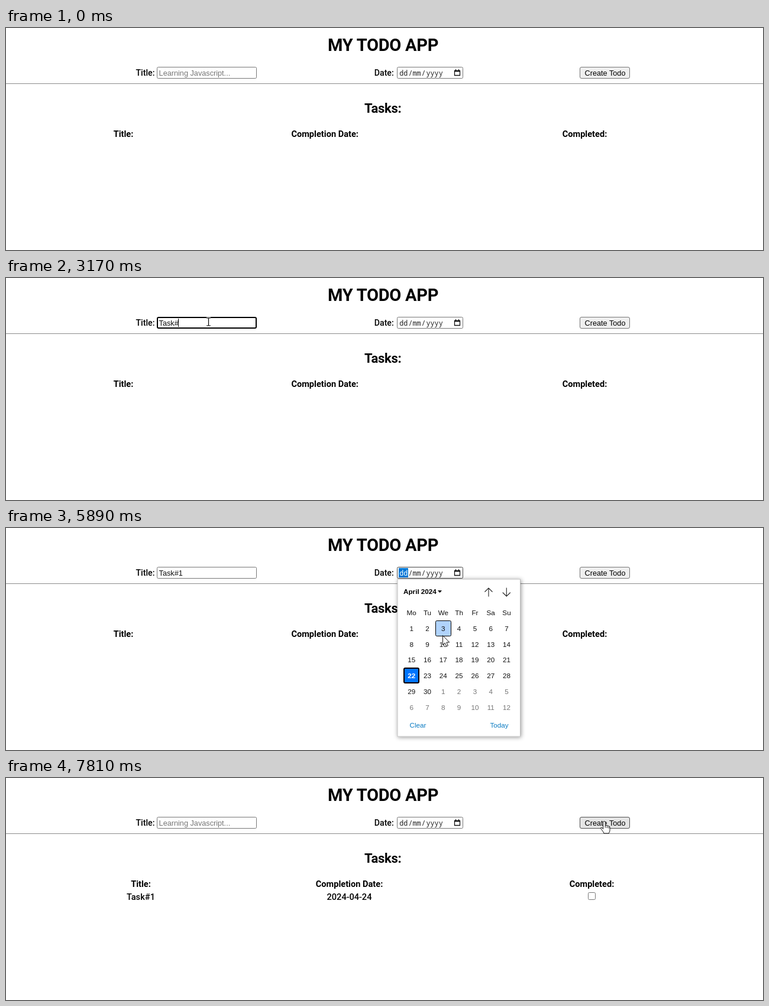
These frames come from a looping animation (1280x377 px, 8 s). An HTML page:

```html
<!DOCTYPE html>
<html lang="en">
<head>
<meta charset="utf-8">
<title>My Todo App</title>
<style>
  html, body { margin: 0; width: 100%; height: 100%; overflow: hidden; background: #fff; }
  svg { display: block; width: 100%; height: 100%; }
  text { white-space: pre; }
  .page { font: 500 14.6px Roboto, sans-serif; }
  .label { font-size: 14.2px; }
  .head { font-weight: 700; }
  .mid { text-anchor: middle; }
  .ui { font: 12.7px "Liberation Sans", Arial, sans-serif; }
  .mono { font: 11.7px "Noto Sans Mono", monospace; }
  .cal { font: 11.7px "Liberation Sans", Arial, sans-serif; }
  .bold { font-weight: 700; }
</style>
</head>
<body>
<svg viewBox="0 0 1280 377" preserveAspectRatio="xMinYMin meet">
  <defs>
    <filter id="shadow" x="-10%" y="-10%" width="120%" height="120%">
      <feDropShadow dx="1" dy="1" stdDeviation="3.5" flood-opacity=".42"/>
    </filter>
  </defs>

  <g class="page">
    <text class="head mid" x="637.7" y="39" font-size="29" letter-spacing="-.25">MY TODO APP</text>
    <text class="label" x="219.5" y="80.5">Title:</text>
    <text class="label" x="622.7" y="80.5">Date:</text>
    <path d="M0 94.5H1280" stroke="#8a8a8a"/>
    <text class="head mid" x="637.2" y="144" font-size="22" letter-spacing="-.3">Tasks:</text>
    <g class="head mid">
      <text id="colTitle" y="185">Title:</text>
      <text id="colDate" y="185">Completion Date:</text>
      <text id="colDone" y="185">Completed:</text>
    </g>
    <g id="row" class="mid">
      <text x="228" y="206.6">Task#1</text>
      <text x="580.5" y="206.6">2024-04-24</text>
      <rect x="984.5" y="194.5" width="12" height="12" rx="2" fill="#fff" stroke="#767676"/>
    </g>
  </g>

  <rect id="titleBox" rx="2" fill="#fff"/>
  <text id="titleText" class="ui" x="258.6" y="80.5"></text>
  <path id="caret" stroke="#000"/>

  <rect id="dateBox" rx="2" fill="#fff"/>
  <rect id="daySelected" x="664" y="68" width="16" height="16" fill="#0078d7"/>
  <g class="mono" fill="#222">
    <text id="day" x="665.2" y="80.6"></text>
    <text x="680.4" y="80.6">/</text>
    <text id="month" x="687.6" y="80.6"></text>
    <text x="702.4" y="80.6">/</text>
    <text id="year" x="710.6" y="80.6"></text>
  </g>
  <path d="M758.5 72.5h9v8h-9zM758.5 73.5h9M760.5 70v2M765.5 70v2" fill="none" stroke="#111" stroke-width="1.3"/>

  <rect id="button" x="970.5" y="66.5" width="84" height="19" rx="2.5"/>
  <text class="ui mid" x="1013" y="80.5">Create Todo</text>

  <g id="popup" class="cal">
    <rect x="662" y="87" width="207.5" height="267" fill="#fff" stroke="#bfbfbf" filter="url(#shadow)"/>
    <text class="bold" x="672" y="112">April 2024</text>
    <path d="M730 106h7l-3.5 4z"/>
    <path d="M816 116.5V102M809.5 108.5L816 102l6.5 6.5M846.3 101.5V116M839.8 109.5l6.5 6.5 6.5-6.5" fill="none" stroke="#222" stroke-width="1.1"/>
    <rect id="hoverCell" width="26" height="26" rx="2" fill="#b0d3fb" stroke="#000"/>
    <rect id="pickedCell" width="25" height="25" rx="2" fill="#0075ff" stroke="#000" stroke-width="2"/>
    <g id="days" class="mid"></g>
    <g fill="#0a7bc2"><text x="682.5" y="338.5">Clear</text><text x="818.5" y="338.5">Today</text></g>
  </g>

  <g id="cursor" stroke-linejoin="round">
    <path id="arrow" d="M0 0V16L3.7 12.6 6.2 18.5 8.9 17.3 6.4 11.6H11.2Z" fill="#fff" stroke="#111"/>
    <g id="beam" fill="none">
      <path d="M-3.5-6.5H3.5M0-6.5V6.5M-3.5 6.5H3.5" stroke="#fff" stroke-width="3"/>
      <path d="M-3.5-6.5H-1L0-6 1-6.5H3.5M0-6V6M-3.5 6.5H-1L0 6 1 6.5H3.5" stroke="#000" stroke-width="1.2"/>
    </g>
    <path id="hand" d="M-1.8 1.5Q-1.8 0 0 0T1.8 1.5V7Q3.8 5.8 4.8 7.6 6.8 6.5 7.6 8.5 9.6 7.9 9.6 10.5V15Q9.6 18 7.6 20.5H-.5Q-1.5 17.5-5 13.5-6.8 10.5-4.5 10.5L-1.8 13ZM1.8 7V11M4.8 8V11.5M7.6 9V12" fill="#fff" stroke="#111"/>
  </g>
</svg>
<script>
const LOOP = 8000;
const FOCUS = 1400, OPEN = 5220, PICK = 6640, CLOSE = 6820, PRESS = 7620, SUBMIT = 7700;
const PITCH = 26.8, GRID_X = 672.3, GRID_Y = 157;

// pointer path: time, x, y
const path = [
  [120, 993, 306], [230, 905, 268], [540, 598, 116], [730, 598, 116], [850, 453, 87],
  [1040, 453, 87], [1240, 353, 79], [1310, 353, 79], [1450, 343, 75], [3900, 343, 75],
  [4080, 510, 54], [4300, 730, 73], [4370, 730, 73], [4690, 751, 73], [4750, 751, 73],
  [5010, 755, 73], [5500, 755, 73], [5700, 748, 120], [5890, 739, 183], [5970, 739, 183],
  [5990, 739, 216], [6230, 739, 216], [6600, 735, 250], [6930, 735, 250], [6960, 806, 174],
  [7090, 920, 125], [7280, 920, 125], [7480, 1012, 74]
];
// typing: time, text
const typing = [[2010, "T"], [2350, "Ta"], [2480, "Tas"], [2690, "Task"], [3170, "Task#"], [3420, "Task#1"]];

const el = {};
document.querySelectorAll("[id]").forEach(node => el[node.id] = node);

function set(node, attrs) {
  for (const name in attrs) node.setAttribute(name, attrs[name]);
}
function show(node, visible) {
  node.style.display = visible ? "" : "none";
}
function write(node, text) {
  if (node.textContent !== text) node.textContent = text;
}

function addDay(col, y, text, fill = "#111") {
  const node = document.createElementNS("http://www.w3.org/2000/svg", "text");
  set(node, { x: GRID_X + PITCH * (col + .5), y, fill });
  node.textContent = text;
  return el.days.appendChild(node);
}
["Mo", "Tu", "We", "Th", "Fr", "Sa", "Su"].forEach((name, i) => addDay(i, 147.5, name));
const days = Array.from({ length: 42 }, (_, i) =>
  addDay(i % 7, 174.8 + PITCH * Math.floor(i / 7), i % 30 + 1, i < 30 ? "#111" : "#757575"));

function pointerAt(t) {
  const next = path.findIndex(p => p[0] > t);
  if (next < 0) return path[path.length - 1].slice(1);
  if (next === 0) return path[0].slice(1);
  const [t0, x0, y0] = path[next - 1], [t1, x1, y1] = path[next];
  const k = (t - t0) / (t1 - t0);
  return [x0 + (x1 - x0) * k, y0 + (y1 - y0) * k];
}

// the border grows inwards, so the outer size stays the same
function drawField(box, left, right, focused, hovered) {
  const line = focused ? 2 : 1;
  set(box, {
    x: left + line / 2, y: 66 + line / 2, width: right - left - line, height: 20 - line,
    stroke: focused ? "#000" : hovered ? "#444" : "#767676", "stroke-width": line
  });
}

function placeCell(node, index, inset) {
  set(node, {
    x: Math.round(GRID_X + PITCH * (index % 7)) + inset,
    y: Math.round(GRID_Y + PITCH * Math.floor(index / 7)) + inset
  });
}

function drawTitle(t, hovered) {
  const focused = t >= FOCUS && t < OPEN;
  let text = "";
  if (t < SUBMIT) for (const [time, value] of typing) if (t >= time) text = value;
  write(el.titleText, text || "Learning Javascript...");
  set(el.titleText, { fill: text ? "#111" : "#757575" });
  drawField(el.titleBox, 255, 424, focused, hovered);

  const blinkOn = t < 3420 || Math.floor((t - 3420) / 500) % 2 === 0;
  show(el.caret, focused && blinkOn);
  const x = text ? Math.round(258.6 + el.titleText.getComputedTextLength()) - .5 : 259.5;
  set(el.caret, { d: `M${x} 69V83` });
}

function drawDate(t, hovered) {
  const filled = t >= CLOSE && t < SUBMIT;
  const selected = t >= OPEN && t < PRESS;
  write(el.day, filled ? "24" : "dd");
  write(el.month, filled ? "04" : "mm");
  write(el.year, filled ? "2024" : "yyyy");
  show(el.daySelected, selected);
  set(el.day, { fill: selected ? "#fff" : "#222" });
  drawField(el.dateBox, 661, 773, t >= CLOSE && t < PRESS, hovered || (t >= OPEN && t < CLOSE));
}

function drawPopup(t, x, y) {
  const open = t >= OPEN && t < CLOSE;
  show(el.popup, open);
  if (!open) return;
  const picked = t < PICK ? 21 : 23;
  const col = Math.floor((x - GRID_X) / PITCH), line = Math.floor((y - GRID_Y) / PITCH);
  const hover = line * 7 + col;
  show(el.hoverCell, line >= 0 && hover !== picked);
  placeCell(el.hoverCell, hover, .5);
  placeCell(el.pickedCell, picked, 1);
  days.slice(0, 30).forEach((node, i) =>
    set(node, { fill: i === picked ? "#fff" : "#111", class: i === picked ? "bold" : "" }));
}

function drawTasks(added) {
  set(el.colTitle, { x: added ? 228 : 198.5 });
  set(el.colDate, { x: added ? 580.5 : 539.2 });
  set(el.colDone, { x: added ? 990.5 : 978.5 });
  show(el.row, added);
}

function draw(t) {
  const [x, y] = pointerAt(t);
  const inside = (left, right) => t >= 120 && x > left && x < right && y > 66 && y < 86;
  const onTitle = inside(255, 424), onButton = inside(971, 1055);

  drawTitle(t, onTitle);
  drawDate(t, inside(661, 773));
  drawPopup(t, x, y);
  drawTasks(t >= SUBMIT);

  const pressed = t >= PRESS && t < SUBMIT;
  set(el.button, {
    fill: pressed ? "#f5f5f5" : onButton ? "#e5e5e5" : "#efefef",
    stroke: onButton && !pressed ? "#4f4f4f" : "#767676"
  });

  show(el.cursor, t >= 120);
  show(el.arrow, !onTitle && !onButton);
  show(el.beam, onTitle);
  show(el.hand, onButton);
  set(el.cursor, { transform: `translate(${Math.round(x) - .5} ${Math.round(y) - .5})` });
}

const start = performance.now();
function tick() {
  draw((performance.now() - start) % LOOP);
  requestAnimationFrame(tick);
}
tick();
</script>
</body>
</html>
```
